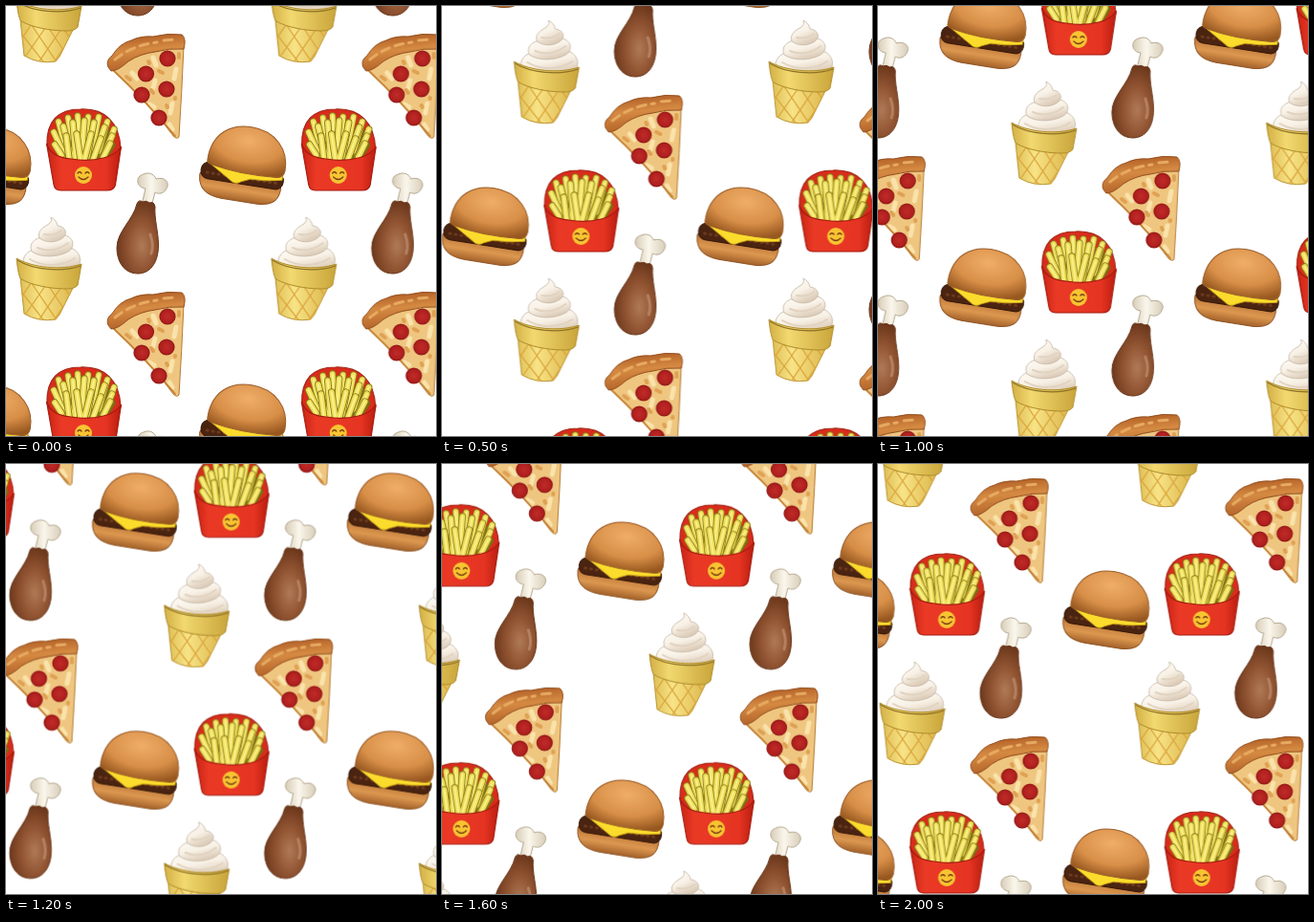
Recreate the animation shown at these times as an HTML page. Size 450 px wide and 450 px high, loop 2.1 s.

```html
<!DOCTYPE html>
<html lang="en">
<head>
<meta charset="utf-8">
<title>Drifting snacks</title>
<style>
  html, body { margin: 0; width: 100%; height: 100%; overflow: hidden; background: #fff; }
  svg { display: block; width: 100vw; height: 100vh; }
  .drift { animation: drift 2100ms steps(21, end) infinite; }
  @keyframes drift { to { transform: translate(270.5px, 268.8px); } }
  .soft { stroke-linecap: round; stroke-linejoin: round; fill: none; }
  .gap { stroke: #8b7a1c; stroke-width: 7.4; }
  .fry { stroke: #efe05a; stroke-width: 5.6; }
  .shine { stroke: #fbf397; stroke-width: 1.6; }
</style>
</head>
<body>
<svg viewBox="0 0 450 450">
  <defs>
    <radialGradient id="bun" cx=".48" cy=".3" r=".75">
      <stop offset="0" stop-color="#efae68"/><stop offset=".6" stop-color="#d88f48"/><stop offset="1" stop-color="#97571f"/>
    </radialGradient>
    <linearGradient id="heel" x2="0" y2="1">
      <stop offset="0" stop-color="#b87034"/><stop offset=".55" stop-color="#dc9850"/><stop offset="1" stop-color="#a4622a"/>
    </linearGradient>
    <radialGradient id="meat" cx=".6" cy=".62" r=".62">
      <stop offset="0" stop-color="#b07a56"/><stop offset=".5" stop-color="#935634"/><stop offset="1" stop-color="#6c371b"/>
    </radialGradient>
    <linearGradient id="bone">
      <stop offset="0" stop-color="#d8cdb8"/><stop offset=".45" stop-color="#fbf7ec"/><stop offset="1" stop-color="#d9ceba"/>
    </linearGradient>
    <linearGradient id="box">
      <stop offset="0" stop-color="#c92314"/><stop offset=".2" stop-color="#ea3a26"/><stop offset=".8" stop-color="#e63422"/><stop offset="1" stop-color="#b81d10"/>
    </linearGradient>
    <linearGradient id="cone">
      <stop offset="0" stop-color="#dfbf55"/><stop offset=".35" stop-color="#f8e487"/><stop offset="1" stop-color="#dcb64b"/>
    </linearGradient>
    <linearGradient id="rim">
      <stop offset="0" stop-color="#d3b045"/><stop offset=".3" stop-color="#f2d970"/><stop offset="1" stop-color="#c9a53a"/>
    </linearGradient>
    <linearGradient id="cream" x2=".5" y2="1">
      <stop offset="0" stop-color="#fffdf8"/><stop offset=".55" stop-color="#f8f1e6"/><stop offset="1" stop-color="#dccbb7"/>
    </linearGradient>
    <linearGradient id="crust" x2=".2" y2="1">
      <stop offset="0" stop-color="#a8541f"/><stop offset=".5" stop-color="#d58a42"/><stop offset="1" stop-color="#b4642a"/>
    </linearGradient>
    <radialGradient id="pep">
      <stop offset="0" stop-color="#c02c28"/><stop offset=".75" stop-color="#b0201f"/><stop offset="1" stop-color="#8a1614"/>
    </radialGradient>
    <clipPath id="coneEdge"><path d="M15 284L19 322Q34 331 52 328L56 323L72 291Z"/></clipPath>
    <path id="backFries" d="M55 121L63 152M65 117L70 150M75 115L77 150M86 116L82 150M97 116L90 150M106 121L97 152M113 129L104 153"/>
    <path id="midFries" d="M50 132L61 156M60 126L68 158M70 122L73 158M82 120L79 157M92 122L85 158M103 127L92 158M111 136L101 158"/>
    <path id="frontFries" d="M51 145L58 156M63 136L66 160M74 134L78 161M89 134L82 161M99 139L91 161M109 144L102 158"/>
    <circle id="slice" r="8.6" fill="url(#pep)"/>

    <g id="fries">
      <path d="M43 146C42 120 55 108 78 108C104 107 119 122 120 150L108 164H54Z" fill="#d92c1b" stroke="#a3281a" stroke-width="1.2"/>
      <path d="M49 142L58 130H108L115 146L104 163H58Z" fill="#7e6b17"/>
      <g class="soft">
        <use href="#backFries" class="gap"/><use href="#backFries" class="fry"/><use href="#backFries" class="shine"/>
        <use href="#midFries" class="gap"/><use href="#midFries" class="fry"/><use href="#midFries" class="shine"/>
        <use href="#frontFries" class="gap"/><use href="#frontFries" class="fry"/><use href="#frontFries" class="shine"/>
      </g>
      <path d="M42.500 144C46 155 55 159 68 160Q86 163 102 159Q115 156 120.500 147L114.500 187Q113 193 106 193H57Q51 193 50 187Z" fill="url(#box)" stroke="#a51b10" stroke-width="1.2"/>
      <circle cx="81" cy="177" r="9" fill="#f8c432"/>
      <path class="soft" d="M75 175q2 -2.500 4 0M83 175q2 -2.500 4 0M76 179q5 5 10 0" stroke="#7c3f14" stroke-width="1.300"/>
    </g>

    <g id="burger" transform="translate(249 166) rotate(9)">
      <path d="M-44 18Q-45 13 -38 14H36Q43 14 42 21C41 34 33 38 20 38.500H-18C-34 38 -43 32 -44 18Z" fill="url(#heel)" stroke="#8f5525"/>
      <rect x="-43.500" y="3" width="87" height="17.500" rx="8" fill="#4a2411" stroke="#341707"/>
      <path class="soft" d="M-37 14H37" stroke="#6d3a1d" stroke-width="3" stroke-dasharray="1 5"/>
      <path d="M-39 2L-12 18Q-6 23 0 18L9 14Q26 14 42 10V2Z" fill="#fbdc2c" stroke="#c79b17" stroke-width=".8"/>
      <path d="M-38.500 0C-38 -28 -20 -40 2 -40C28 -40 44 -22 43.500 0Q43 7 36 8C12 10 -15 9 -34 5Q-38.500 4 -38.500 0Z" fill="url(#bun)" stroke="#9a5c28"/>
    </g>

    <g id="drum">
      <path d="M142 208L146 191C136 190 135 178 144 176C150 173 156 177 157 181C166 178 172 185 168 191C165 197 159 197 156 195L152 210Z" fill="url(#bone)" stroke="#b3a68e"/>
      <path d="M137 207Q139 202 143 205Q147 203 150 206Q155 204 156 210C155 223 159.500 236 159.500 250C159.500 270 150 280 138 280C124 280 116 268 116 253C116 236 133 224 137 207Z" fill="url(#meat)" stroke="#693619"/>
      <path class="soft" d="M151 239q4 12 1 20" stroke="#c79a7c" stroke-width="3" opacity=".6"/>
    </g>

    <g id="ice">
      <g fill="url(#cream)" stroke="#c9bcab" stroke-width=".9">
        <path d="M18 270C17 259 26 254 38 253L70 254C80 260 79 270 73 276C56 281 30 280 18 270Z"/>
        <path d="M27 257C23 247 32 242 43 241L62 240C72 243 72 253 65 257C55 263 37 264 27 257Z"/>
        <path d="M35 243C32 235 40 231 45 228Q49 225 47 221Q53 224 54 230C63 231 65 239 59 243C52 248 42 248 35 243Z"/>
      </g>
      <path class="soft" d="M25 265C40 274 60 272 72 264M33 253C44 258 56 255 65 248M40 239Q50 241 58 235" stroke="#e2d3c0" stroke-width="2"/>
      <path d="M15 284L19 322Q34 331 52 328L56 323L72 291Z" fill="url(#cone)" stroke="#b99330"/>
      <path class="soft" clip-path="url(#coneEdge)" d="M12 294L42 332M24 286L54 330M40 286L64 322M56 288L72 310M30 284L14 308M46 286L18 326M62 288L32 332M74 294L48 332" stroke="#dba53c" stroke-width="1.300"/>
      <path d="M11 264C28 274 58 277 79 270L75 292Q72 296 64 296C45 296 27 292 16 286Q13 284 11 264Z" fill="url(#rim)" stroke="#b08c2c"/>
      <path class="soft" d="M12 266C28 276 58 279 78 272" stroke="#8d7226" stroke-width="1.200"/>
    </g>

    <g id="pizza">
      <path d="M110 65L150 46L186 42Q184 90 181 137Q179 140 175 136Q150 101 110 65Z" fill="#efc680" stroke="#b57a35"/>
      <g class="soft" stroke-width="5">
        <path d="M132 70l5 6M154 54l3 8M178 66l-2 10M156 78l-2 8M150 103l5 3M174 102l-2 10M171 124l3 5" stroke="#fae3ab"/>
        <path d="M126 74l4 3M160 68l4 2M181 50l0 4M152 88l2 3M177 96l0 1M168 104l1 2M149 58l1 2" stroke="#dfa153" stroke-width="4"/>
      </g>
      <path class="soft" d="M112 67Q145 98 177 136" stroke="#c58336" stroke-width="1.800"/>
      <use href="#slice" x="169" y="55"/>
      <use href="#slice" x="146.500" y="71"/>
      <use href="#slice" x="168" y="87"/>
      <use href="#slice" x="142" y="93"/>
      <use href="#slice" x="160" y="117"/>
      <path d="M107 64Q104 57 111 52Q119 39 131 36Q141 31 154 32Q169 28 184 30Q189 34 186 45Q170 44 156 48Q140 50 128 58Q117 68 110 68Z" fill="url(#crust)" stroke="#94501f"/>
      <path class="soft" d="M114 56Q132 41 158 38M165 36l14 -1" stroke="#e6a961" stroke-width="3" stroke-dasharray="9 6"/>
    </g>

    <g id="tile">
      <use href="#fries"/><use href="#burger"/><use href="#drum"/><use href="#ice"/><use href="#pizza"/>
    </g>
    <g id="row">
      <use href="#tile" x="-533.4"/><use href="#tile" x="-266.7"/><use href="#tile"/><use href="#tile" x="266.7"/>
    </g>
  </defs>

  <g class="drift">
    <use href="#row" y="-540"/><use href="#row" y="-270"/><use href="#row"/><use href="#row" y="270"/>
  </g>
</svg>
</body>
</html>
```
